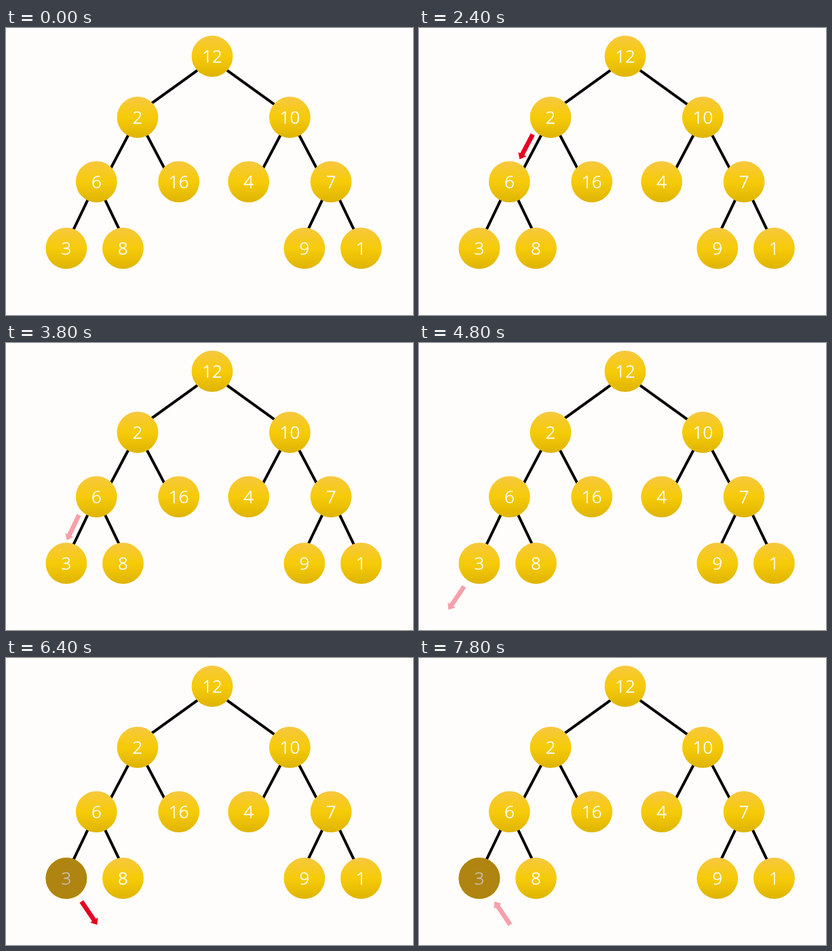
An HTML page that plays this animation: 600x423 px, repeating every 8 s.

```html
<!DOCTYPE html>
<html lang="en">
<head>
<meta charset="utf-8">
<title>Tree traversal</title>
<style>
  html, body { margin: 0; width: 100%; height: 100%; overflow: hidden; background: #fefdfb; }
  svg { display: block; width: 100%; height: 100%; }
  line { stroke: #000; stroke-width: 4; }
  text {
    font: 300 26px "Open Sans", "Noto Sans", sans-serif; text-anchor: middle;
    fill: currentColor; stroke: currentColor; stroke-width: .5;
  }
  .arrow { fill: #e60020; }
</style>
</head>
<body>
<svg id="stage" viewBox="0 0 600 423">
  <defs>
    <linearGradient id="gold" x2="0" y2="1">
      <stop offset="0" stop-color="#f7c840"/>
      <stop offset=".5" stop-color="#f6cb08"/>
      <stop offset="1" stop-color="#dfb404"/>
    </linearGradient>
  </defs>
</svg>
<script>
const stage = document.getElementById('stage');
const LOOP = 8000, STEP = 1000, RADIUS = 30.4, ARROW_LENGTH = 41.5;

// Heap order: the children of slot i are slots 2i + 1 and 2i + 2.
const values = [12, 2, 10, 6, 16, 4, 7, 3, 8, , , , , 9, 1];

// Children stand at ±spread from their parent, pushed outward by drift;
// edges fan out to ±fan, starting drop below the parent's centre.
const levels = [
  { y: 41.7 },
  { y: 131.7, spread: 112.2, drift: 2.2, fan: 118, drop: 5 },
  { y: 226.6, spread: 60.7, drift: 0, fan: 50, drop: 0 },
  { y: 324.7, spread: 41.8, drift: 2.6, fan: 47, drop: 0 }
];

const nodes = [];
values.forEach((value, i) => {
  const level = levels[Math.floor(Math.log2(i + 1))];
  const node = nodes[i] = { value, x: 304, y: level.y };
  if (i === 0) return;
  const parent = nodes[(i - 1) >> 1];
  const side = i % 2 ? -1 : 1;
  const outward = parent.x < nodes[0].x ? -1 : 1;
  node.x = parent.x + side * level.spread + outward * level.drift;
  node.edge = {
    x1: parent.x, y1: parent.y + level.drop,
    x2: parent.x + side * level.fan, y2: level.y
  };
});

function add(tag, attrs, parent = stage) {
  const el = document.createElementNS('http://www.w3.org/2000/svg', tag);
  for (const key in attrs) el.setAttribute(key, attrs[key]);
  return parent.appendChild(el);
}

function addNode({ value, x, y }, fill, color) {
  const group = add('g', { transform: `translate(${x} ${y})`, color });
  add('circle', { r: RADIUS, fill }, group);
  add('text', { y: 9 }, group).textContent = value;
  return group;
}

function addArrow({ x, y, angle }) {
  const tip = ARROW_LENGTH / 2, neck = tip - 8.5;
  return add('path', {
    class: 'arrow',
    transform: `translate(${x} ${y}) rotate(${angle})`,
    d: `M${-tip}-3.4H${neck}V-6.7L${tip} 0L${neck} 6.7V3.4H${-tip}Z`
  });
}

function besideEdge({ x1, y1, x2, y2 }) {
  const turn = Math.atan2(y2 - y1, x2 - x1), along = 0.515, gap = 11.6;
  return {
    x: x1 + (x2 - x1) * along - Math.sin(turn) * gap,
    y: y1 + (y2 - y1) * along + Math.cos(turn) * gap,
    angle: turn * 180 / Math.PI
  };
}

const belowLeaf = (leaf, side) =>
  ({ x: leaf.x + side * 34, y: leaf.y + 51.3, angle: 90 - side * 34 });
const reversed = arrow => ({ ...arrow, angle: arrow.angle + 180 });

nodes.forEach(node => node.edge && add('line', node.edge));
nodes.forEach(node => addNode(node, 'url(#gold)', '#fff'));

const leaf = nodes[7];
const visited = addNode(leaf, '#af8410', '#c5c0b8');
const left = belowLeaf(leaf, -1), right = belowLeaf(leaf, 1);
const arrows = [
  ...[1, 3, 7].map(i => besideEdge(nodes[i].edge)),
  left, reversed(left), right, reversed(right)
].map(addArrow);

const ramp = (t, from, to) => Math.min(1, Math.max(0, (t - from) / (to - from)));

function draw(now) {
  const t = now % LOOP;
  arrows.forEach((arrow, i) => {
    const local = t - (i + 1) * STEP;
    arrow.setAttribute('opacity', Math.min(ramp(local, 60, 340), 1 - ramp(local, 640, 895)));
  });
  visited.setAttribute('opacity', ramp(t, 5000, 5530));
  requestAnimationFrame(draw);
}
draw(performance.now());
</script>
</body>
</html>
```
